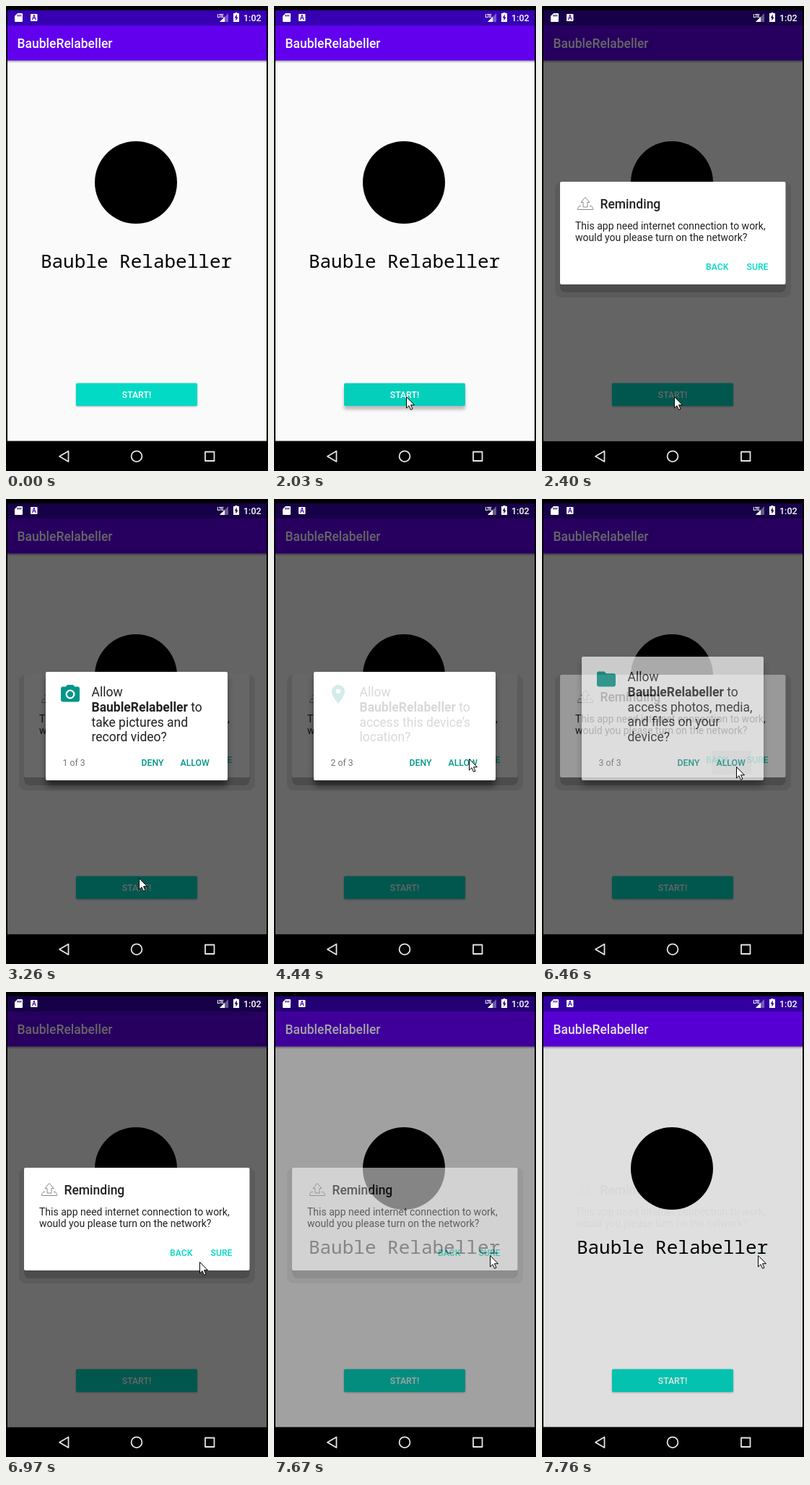
Write an HTML page that moves like this. It is 363 by 643 pixels and loops after 8000 ms.

```html
<!DOCTYPE html>
<html lang="en">
<head>
<meta charset="utf-8">
<title>Bauble Relabeller</title>
<style>
  html, body { margin: 0; width: 100%; height: 100%; overflow: hidden; background: #000; }
  svg { display: block; width: 363px; height: 643px; font-family: Roboto, sans-serif; }
  .title { font-size: 17.5px; font-weight: 500; }
  .btn { font-size: 12.25px; font-weight: 500; }
  .mono { font: 26px "Noto Sans Mono", monospace; }
  .msg { font-size: 14px; fill: #212121; }
  .ask { font-size: 17.5px; fill: #212121; }
  .ask .name { font-weight: 700; }
  #start { fill: #03dac5; filter: drop-shadow(0 1px 1px rgba(0, 0, 0, .3)); }
  #start.pressed { fill: #03cfbb; filter: drop-shadow(0 5px 2px rgba(0, 0, 0, .25)); }
</style>
</head>
<body>
<svg viewBox="0 0 363 643">
  <defs>
    <filter id="soft" x="-20%" y="-40%" width="140%" height="180%"><feGaussianBlur stdDeviation="5"/></filter>
    <linearGradient id="edge" x2="0" y2="1">
      <stop stop-opacity=".32"/><stop offset="1" stop-opacity="0"/>
    </linearGradient>
  </defs>
  <rect width="363" height="643"/>

  <!-- start screen -->
  <rect x="2" y="6" width="359" height="595.5" fill="#fafafa"/>
  <rect x="2" y="6" width="359" height="21" fill="#3700b3"/>
  <rect x="2" y="27" width="359" height="48.5" fill="#6200ee"/>
  <rect x="2" y="75.5" width="359" height="3.5" fill="url(#edge)"/>
  <text class="title" x="15.5" y="58" fill="#fff">BaubleRelabeller</text>
  <circle cx="180" cy="244" r="57"/>
  <text class="mono" x="180.5" y="362" text-anchor="middle">Bauble Relabeller</text>
  <rect id="start" x="97" y="521.5" width="168" height="31.5" rx="1.75"/>
  <text class="btn" x="181" y="542" text-anchor="middle" fill="#fff">START!</text>
  <rect id="dim" x="2" y="6" width="359" height="595.5"/>

  <!-- network dialog -->
  <g id="remind">
    <g id="sheet">
      <rect x="18" y="243" width="327" height="160" rx="9" fill-opacity=".09"/>
      <rect x="25" y="243" width="313" height="153" rx="8" fill-opacity=".16"/>
      <rect x="25" y="243" width="312.5" height="142" rx="2" fill="#fff"/>
    </g>
    <g fill="none" stroke="#8a8a8a">
      <path d="M60 264.5L66 271.5H63V278H57V271.5H54Z"/>
      <path d="M54 276.5H51.5L49.5 279.5V281.5H70.5V279.5L68.5 276.5H66"/>
    </g>
    <text class="title" x="80.5" y="279.5" fill="#212121">Reminding</text>
    <text class="msg" x="46" y="308.5">This app need internet connection to work,</text>
    <text class="msg" x="46" y="325">would you please turn on the network?</text>
    <g class="btn" fill="#03dac5">
      <text x="227" y="365">BACK</text>
      <text x="283.5" y="365">SURE</text>
    </g>
  </g>

  <!-- permission dialog -->
  <g id="perm">
    <rect id="shade" x="56" width="250" fill-opacity=".5" filter="url(#soft)"/>
    <rect id="card" x="55" width="252" rx="2" fill="#fff"/>
    <g id="ask"></g>
    <rect id="ripple" x="235" y="348" width="55" height="33" rx="2" fill="#f7f7f7"/>
    <text id="count" x="78.5" y="369" font-size="12.25" fill="#757575"></text>
    <g class="btn" fill="#009688">
      <text x="187.5" y="369">DENY</text>
      <text x="241.5" y="369">ALLOW</text>
    </g>
  </g>

  <!-- system bars -->
  <g fill="#fff">
    <path fill-rule="evenodd" d="M16 10H22Q23 10 23 11V21Q23 22 22 22H13Q12 22 12 21V14ZM15.5 12V14.5H16.7V12ZM17.7 12V14.5H18.9V12ZM19.9 12V14.5H21.1V12Z"/>
    <rect x="34" y="11" width="9.5" height="10" rx="1"/>
    <text x="38.75" y="19" font-size="8.5" font-weight="700" text-anchor="middle" fill="#3700b3">A</text>
    <text x="292.5" y="16" font-size="6.5" font-weight="700" letter-spacing="-.7">LTE</text>
    <path d="M308 10V22H296Z" fill-opacity=".35"/>
    <path d="M303 15V22H296Z"/>
    <path fill-rule="evenodd" d="M317.5 10V9H320.5V10H323V22H315V10ZM319.7 11.5L316.7 16.5H318.5V20.5L321.5 15.5H319.7Z"/>
    <text x="329" y="21" font-size="12.5" font-weight="500">1:02</text>
  </g>
  <g fill="none" stroke="#e4e4e4" stroke-width="1.8" stroke-linejoin="round">
    <path d="M86.5 615.5V630L74 622.7Z"/>
    <circle cx="181" cy="622.7" r="7.4"/>
    <rect x="276" y="616.5" width="12.5" height="12.5"/>
  </g>

  <path id="mouse" d="M.5 .5V16L4 12.7L6.5 18.3L9 17.2L6.5 11.7H11.5Z" fill="#fff" stroke="#000"/>
</svg>
<script>
  const LOOP = 8000;
  const FRAME = 65;
  const $ = id => document.getElementById(id);
  const set = (id, attrs) => {
    for (const key in attrs) $(id).setAttribute(key, attrs[key]);
  };

  const asks = [
    { top: 239, lines: ['take pictures and', 'record video?'], enter: [0, 100], leave: [3970, 4090],
      icon: 'M9 2L7.17 4H4c-1.1 0-2 .9-2 2v12c0 1.1.9 2 2 2h16c1.1 0 2-.9 2-2V6c0-1.1-.9-2-2-2h-3.17L15 2zM12 17a5 5 0 1 1 0-10 5 5 0 0 1 0 10zM12 8.8a3.2 3.2 0 1 0 0 6.4 3.2 3.2 0 0 0 0-6.4z' },
    { top: 239, lines: ['access this device’s', 'location?'], enter: [4440, 4790], leave: [5130, 5270],
      icon: 'M12 2a7 7 0 0 0-7 7c0 5.25 7 13 7 13s7-7.75 7-13a7 7 0 0 0-7-7zM12 6.5a2.5 2.5 0 1 1 0 5 2.5 2.5 0 0 1 0-5z' },
    { top: 218, lines: ['access photos, media,', 'and files on your', 'device?'], enter: [5590, 5850], leave: [7000, 7100],
      icon: 'M10 4H4c-1.1 0-2 .9-2 2v12c0 1.1.9 2 2 2h16c1.1 0 2-.9 2-2V8c0-1.1-.9-2-2-2h-8z' }
  ];

  function askMarkup({ top, lines, icon }) {
    const rows = ['Allow', '<tspan class="name">BaubleRelabeller</tspan> to', ...lines];
    const text = rows.map((row, i) => `<text x="118.5" y="${top + 34.3 + 20.6 * i}">${row}</text>`);
    return `<g class="ask"><path transform="translate(73.4 ${top + 15.4}) scale(1.3)"
      fill="#009688" fill-rule="evenodd" d="${icon}"/>${text.join('')}</g>`;
  }
  $('ask').innerHTML = asks.map(askMarkup).join('');

  // Rises from 0 to 1 in equal steps; the first step falls on from, the last on to.
  function ramp(t, from, to) {
    const gaps = Math.round((to - from) / FRAME);
    const step = Math.floor((t - from) / (to - from) * gaps + 1e-6) + 1;
    return Math.min(1, Math.max(0, step / (gaps + 1)));
  }

  const entry = { x: 310, y: 630 };
  const moves = [
    { from: 500, to: 880, x: 183, y: 540 },
    { from: 3260, to: 3760, x: 270, y: 357 },
    { from: 4440, to: 4790, x: 269, y: 370 },
    { from: 6970, to: 7030, x: 263, y: 376 },
    { from: 7180, to: 7420, x: 299, y: 364 }
  ];

  // Sideways motion starts slower than vertical, which bends each path.
  function mouseAt(t) {
    let { x, y } = entry;
    for (const move of moves) {
      const p = ramp(t, move.from, move.to);
      x += (move.x - x) * p ** 2;
      y += (move.y - y) * p ** 1.1;
    }
    return [x, y];
  }

  const taps = [3970, 5130, 6460];

  function draw(now) {
    const t = now % LOOP;
    const open = ramp(t, 2270, 2400), close = ramp(t, 7670, 7760);
    const perm = ramp(t, 2460, 2600) - ramp(t, 6460, 6600);
    const top = 239 - 21 * ramp(t, 5130, 5270);
    const page = 1 + (t >= 4090) + (t >= 5270);

    set('mouse', {
      transform: `translate(${mouseAt(t).map(Math.round)})`,
      visibility: t < moves[0].from ? 'hidden' : 'visible'
    });
    $('start').classList.toggle('pressed', t >= 2030 && t < 2340);
    set('dim', { 'fill-opacity': .6 * open - .49 * close });
    set('remind', { opacity: open - .96 * close });
    set('sheet', { opacity: close < 1 ? 1 : 0 });
    $('remind').style.filter = perm ? `brightness(${1 - .6 * perm})` : 'none';
    set('perm', { opacity: perm });
    set('card', { y: top, height: 389 - top });
    set('shade', { y: top + 8, height: 389 - top });
    set('ripple', { opacity: taps.some(tap => t >= tap && t < tap + 460) ? 1 : 0 });
    $('count').textContent = `${page} of 3`;
    asks.forEach(({ enter, leave }, i) => {
      $('ask').children[i].setAttribute('opacity', ramp(t, ...enter) - ramp(t, ...leave));
    });
  }

  const began = performance.now();
  function tick() {
    draw(performance.now() - began);
    requestAnimationFrame(tick);
  }
  tick();
</script>
</body>
</html>
```
